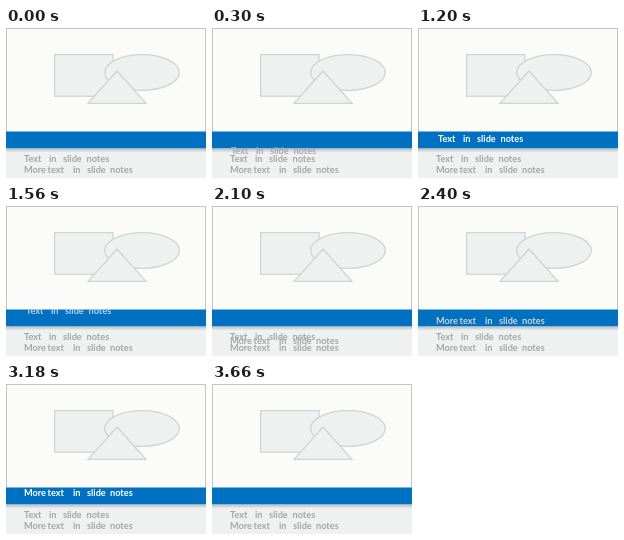
Animation, 200 px wide and 150 px high, one loop 3.72 s. Source, as an HTML page:

```html
<!DOCTYPE html>
<html lang="en">
<head>
<meta charset="utf-8">
<title>Slide notes ticker</title>
<style>
  html, body { margin: 0; width: 100%; height: 100%; overflow: hidden; background: #eff0f0; }
  svg { display: block; width: 100vw; height: 100vh; }
  text { font: bold 9.2px Lato, Carlito, sans-serif; fill: #a6a6a6; }
</style>
</head>
<body>
<svg viewBox="0 0 200 150">
  <defs>
    <clipPath id="below"><rect y="103.5" width="200" height="46.5"/></clipPath>
    <linearGradient id="shade" x2="0" y2="1">
      <stop offset="0" stop-color="#b3c0c6"/>
      <stop offset="1" stop-color="#e6e9e9"/>
    </linearGradient>
  </defs>
  <rect width="200" height="150" fill="#eff0f0"/>
  <rect x=".5" y=".5" width="199" height="110" fill="#fbfcf9" stroke="#c3c5c4"/>
  <g fill="#eff1f0" stroke="#d0d4d4" stroke-width="1.3">
    <rect x="48.6" y="26.6" width="58.4" height="41.6"/>
    <ellipse cx="136" cy="44.5" rx="37.3" ry="17.8"/>
    <path d="M111 43 140 75.3H82Z"/>
  </g>
  <rect y="103.5" width="200" height="17" fill="#0070c0"/>
  <rect y="120.5" width="200" height="3.5" fill="url(#shade)"/>
  <g id="notes"></g>
  <g id="moving" clip-path="url(#below)"></g>
</svg>
<script>
const STEP = 60, LOOP = 3720, REST = 116.5, GREY = 166;

// Times are counted in steps; each entry and exit starts on the step after "in" / "out".
const lines = [
  { words: [["Text", 18], ["in", 43], ["slide", 57], ["notes", 80.5]],
    y: 133.5, dx: 2, in: 1, rise: 9, fade: 7, out: 17, end: 30 },
  { words: [["More", 18], ["text", 41.5], ["in", 67], ["slide", 81], ["notes", 104]],
    y: 145.3, dx: 0, in: 33, rise: 7.5, fade: 5, out: 49, end: 61 }
];

const clamp = v => Math.max(0, Math.min(1, v));

function addText(parent, line) {
  const el = document.createElementNS("http://www.w3.org/2000/svg", "text");
  for (const [word, x] of line.words) {
    const span = document.createElementNS(el.namespaceURI, "tspan");
    span.setAttribute("x", x);
    span.textContent = word;
    el.append(span);
  }
  el.setAttribute("y", line.y);
  parent.append(el);
  return el;
}

const notes = document.getElementById("notes");
const moving = document.getElementById("moving");
for (const line of lines) {
  addText(notes, line);
  line.copy = addText(moving, line);
}

function draw(time) {
  const n = Math.floor((time % LOOP) / STEP);
  for (const { copy, y, dx, in: start, rise, fade, out, end } of lines) {
    const k = n - start;
    const up = clamp(k / rise);
    const gone = Math.max(0, n - out);
    const tone = Math.round(GREY + (255 - GREY) * clamp((k - fade) / 4));
    copy.style.display = k > 0 && n < end ? "" : "none";
    copy.setAttribute("transform", `translate(${dx * up} ${(REST - y) * up - gone})`);
    copy.style.fill = `rgb(${tone},${tone},${tone})`;
    copy.style.opacity = 1 - 0.3 * clamp((gone - 4) / 5);
  }
}

const begin = performance.now();
function tick() {
  draw(performance.now() - begin);
  requestAnimationFrame(tick);
}
tick();
</script>
</body>
</html>
```
